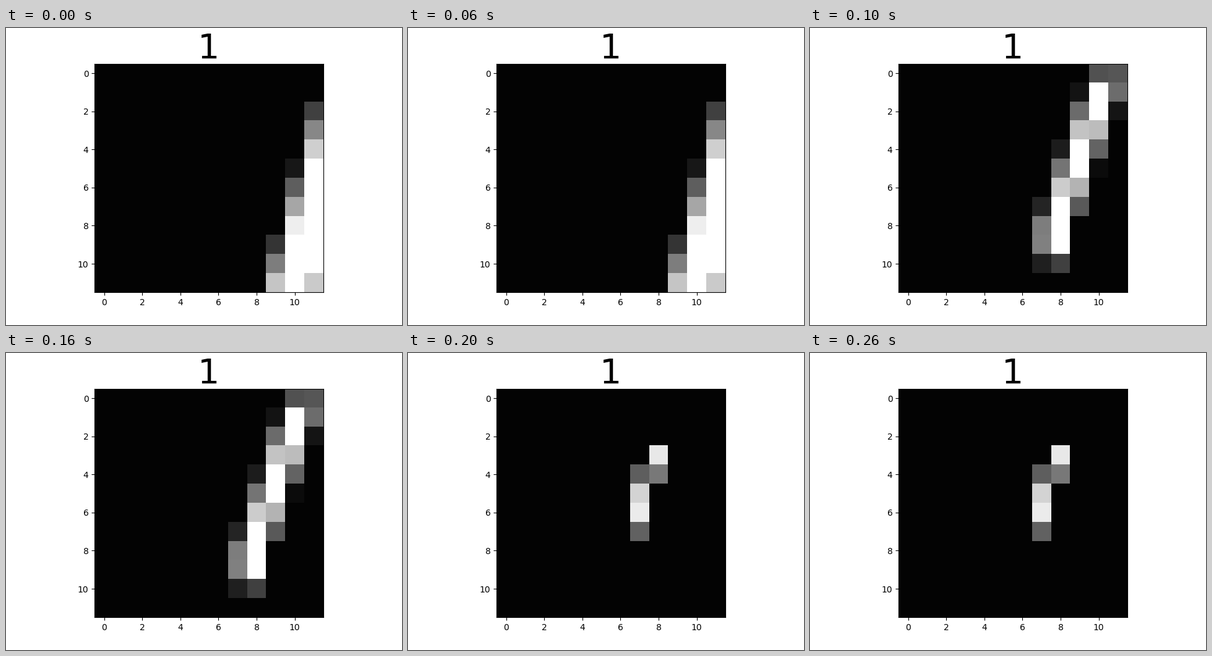
These frames come from a looping animation (640x480 px, 0.3 s). A matplotlib script:

```python
import numpy as np
import matplotlib.pyplot as plt
from matplotlib.animation import FuncAnimation

SIZE = 12
DARK, WHITE = 3, 255


def stroke(x0, slope, x_min, half_width, top, bottom):
    """Soft slanted stroke that straightens at x_min and fades at both ends."""
    y, x = np.mgrid[:SIZE, :SIZE]
    centre = np.maximum(x0 - slope * y, x_min)
    body = np.clip(half_width - np.abs(x - centre), 0, 1)
    ends = np.clip(np.minimum(y - top, bottom - y), 0, 1)
    return np.maximum(WHITE * body * ends, DARK)


# The digit shrinks and moves inward from one layer to the next.
layers = [
    stroke(13.09, 0.28, 0, 1.78, 0, SIZE),
    stroke(10.52, 0.345, 7.75, 1.25, -0.44, 10.25),
    stroke(9.39, 0.46, 7, 0.92, 2, 7.42),
]

fig, ax = plt.subplots(figsize=(6.4, 4.8), dpi=100)
image = ax.imshow(layers[0], cmap="gray", vmin=0, vmax=WHITE)
ax.set_title("1", fontsize=40, y=1)


def update(i):
    image.set_data(layers[i])
    return [image]


anim = FuncAnimation(fig, update, frames=len(layers), interval=100,
                     repeat=True, repeat_delay=0)
plt.show()
```
